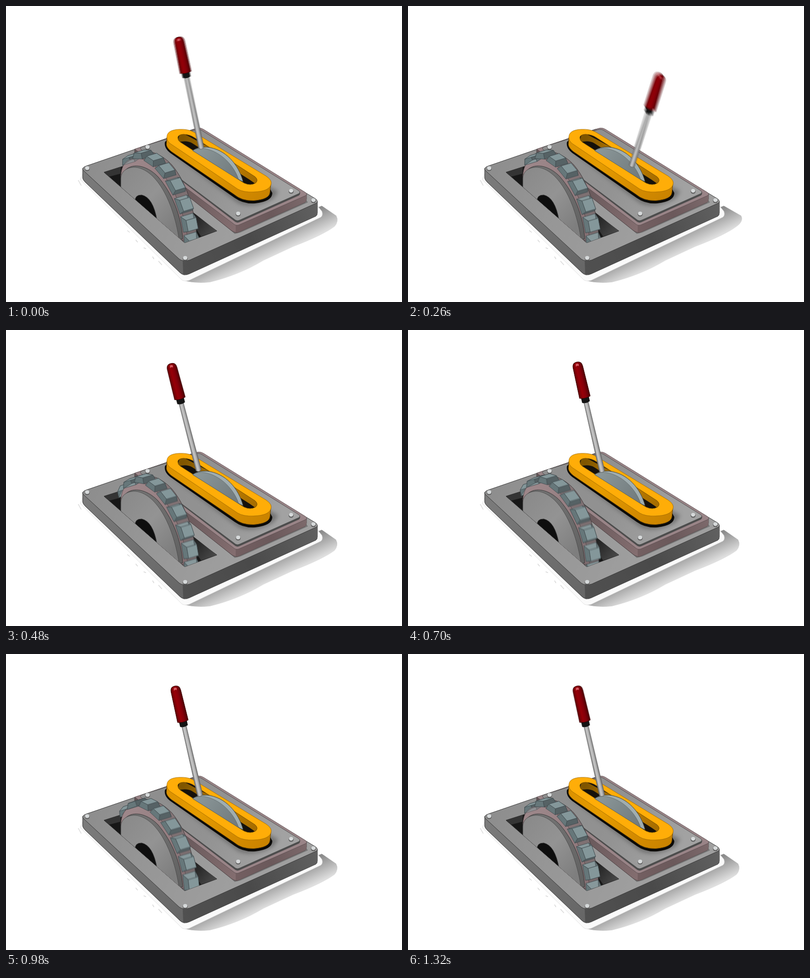
Animation of 800x600 px, one loop 1340 ms. Source, as an HTML page with a canvas:

```html
<!DOCTYPE html>
<html>
<head>
<meta charset="utf-8">
<title>Lever and gear</title>
<style>
html, body { margin: 0; width: 100%; height: 100%; overflow: hidden; background: #fff; }
canvas { display: block; }
</style>
</head>
<body>
<canvas id="stage" width="800" height="600"></canvas>
<script>
const LOOP = 1340, STEP = 20, SAMPLES = 5, SHUTTER = 9;
const ctx = document.getElementById('stage').getContext('2d');
const buffer = document.createElement('canvas');
buffer.width = 800;
buffer.height = 600;
const g = buffer.getContext('2d');

// keys: time, position of the handle tip
const LEVER = [[-20, 341], [0, 348], [60, 385], [120, 455], [200, 520], [260, 511], [380, 380],
  [460, 334], [480, 333], [540, 342], [600, 341], [1300, 341], [1320, 341], [1340, 348], [1400, 385]];
// keys: time, turn counted in teeth
const TURN = [[-100, 0], [0, 0], [260, 1.03], [480, 2.14], [700, 4.28], [860, 5.62],
  [1120, 7.46], [1320, 8], [1440, 8]];
// keys: tooth index, x, y along the rim
const RIM = [[-1, 234, 352], [0, 237, 322], [1, 251, 304], [2, 276, 295], [3, 301, 306], [4, 325, 328],
  [5, 347, 361], [6, 365, 402], [7, 376, 443], [8, 381, 484], [9, 381, 520]];

// smooth curve through the keys
function curve(keys, t) {
  let i = 0;
  while (i < keys.length - 2 && keys[i + 1][0] <= t) i++;
  const a = keys[i], b = keys[i + 1];
  const p = keys[Math.max(i - 1, 0)], n = keys[Math.min(i + 2, keys.length - 1)];
  const h = b[0] - a[0], s = (t - a[0]) / h, s2 = s * s, s3 = s2 * s;
  return a.slice(1).map((v, k) => {
    const w = b[k + 1];
    const m0 = (w - p[k + 1]) / (b[0] - p[0]), m1 = (n[k + 1] - v) / (n[0] - a[0]);
    return v + (w - v) * (3 * s2 - 2 * s3) + h * (m0 * (s3 - 2 * s2 + s) + m1 * (s3 - s2));
  });
}

function shape(d, fill, stroke, width = 1) {
  const path = new Path2D(d);
  if (fill) { g.fillStyle = fill; g.fill(path); }
  if (stroke) { g.strokeStyle = stroke; g.lineWidth = width; g.stroke(path); }
}

function fade(x0, y0, x1, y1, ...colors) {
  const f = g.createLinearGradient(x0, y0, x1, y1);
  colors.forEach((c, i) => f.addColorStop(i / (colors.length - 1), c));
  return f;
}

function quad(points, fill) {
  shape('M' + points.map(p => p.join(' ')).join('L') + 'Z', fill, '#414b4e', .8);
}

function screw(x, y) {
  shape(`M${x - 5} ${y + 1}a5 4.5 0 1 0 10 0a5 4.5 0 1 0 -10 0`, '#5c5c5c');
  shape(`M${x - 4.3} ${y - .4}a4.3 3.9 0 1 0 8.6 0a4.3 3.9 0 1 0 -8.6 0`, '#d6d9da');
}

function ground(pull) {
  const r = 670 + 6 * pull;
  shape(`M358 556Q380 563 412 560Q470 546 520 516L580 488Q640 465 664 447Q${r + 3} 436 ${r - 3} 425L638 405L600 420Z`,
    fade(490, 480, 519, 541, '#8c8c8c', '#b4b4b4', '#dedede', '#f1f1f1'));
  shape('M150 352L355 555Q360 559 370 556L636 428Q641 424 638 416L629 405L350 535L155 340Z', '#fafafa', '#dcdcdc', .8);
  shape('M146 353L152 364M245 455l5 4M262 474l4 5M278 490l5 2M296 508l3 5M308 517l7 8', null, '#dadada', 1.5);
}

function base() {
  shape('M155 329L155 349Q156 353 160 357L351 540Q359 548 370 543L626 426Q629 424 629 419L629 396L357 500Z',
    fade(155, 340, 357, 530, '#7b7b7b', '#676767'), '#303030');
  shape('M357 517Q364 518 371 515L629 398L629 419Q629 424 626 426L370 543Q364 546 358 545Z',
    fade(357, 530, 629, 410, '#505050', '#4a4a4a', '#606060'));
  shape('M155 329Q157 326 163 324L375 251Q385 247 395 251L624 390Q631 394 628 399L371 515Q358 519 350 513L158 335Q154 332 155 329Z',
    fade(160, 320, 480, 470, '#8d8d8d', '#979797', '#9f9f9f'), '#3a3a3a');
  shape('M345 355L462 462L474 459L610 398L604 390L463 442Z', '#777');
  shape('M198 337L245 322L426 456L361 480Z', '#171717', '#2b2b2b');
  shape('M360 404L426 456L394 467L370 430Z', fade(380, 430, 420, 460, '#222', '#484848'));
  shape('M198 337L232 326L231 340L208 346Z', '#343434');
}

function platform() {
  shape('M260 290L260 300L455 455Q464 462 471 458L604 398Q607 396 607 391L607 381L463 430Z',
    fade(340, 370, 464, 455, '#655658', '#846e70'), '#493e40');
  shape('M464 445L607 382L607 391Q607 396 604 398L471 458Q467 460 464 459Z',
    fade(464, 450, 607, 390, '#735f61', '#6b595b', '#7c696b'));
  shape('M260 290L378 251Q390 244 399 250L605 378Q609 381 606 384L470 444Q464 446 459 441Z',
    '#998487', '#594b4d', .8);
  shape('M272 291L461 436Q466 441 472 438L592 384Q595 381 594 377L460 425Z', '#4d4d4d');
  shape('M272 290Q270 287 276 285L380 252Q388 248 395 252L591 374Q595 377 592 380L472 434Q466 437 461 432Z',
    fade(290, 290, 540, 410, '#8e8e8e', '#929292', '#a2a2a2'), '#454545', .8);
  [[164, 329], [286, 286], [621, 394], [362, 511], [469, 421], [576, 375]].forEach(p => screw(...p));
}

function slot() {
  g.save();
  g.filter = 'blur(4px)';
  shape('M325 290L470 400Q500 412 540 390L550 376L520 360Z', '#5559');
  g.restore();
  shape('M321 276Q319 288 332 298L462 389Q480 402 504 400Q538 396 538 379L532 368L330 266Z', '#0b0a08');
  shape('M325 266L324 281Q325 288 334 295L461 382Q476 395 500 394.500Q531 392 533 379L535 361L500 350Z',
    fade(325, 280, 535, 380, '#dc9200', '#e59b00', '#d48b00', '#c98300'), '#6e4700');
  shape('M325 266Q325 251 350 250Q368 249 380 256L526 345Q539 354 535 363Q530 376 500 377Q480 378 468 371L332 279Q325 274 325 266Z',
    '#ffad08', '#9c6700', .8);
  const hole = 'M347 267Q347 261 358 260Q371 260 381 267L503 346Q511 353 504 359Q494 365 481 359L352 276Q347 272 347 267Z';
  g.save();
  g.clip(new Path2D(hole));
  shape(hole, '#15110b');
  shape('M352 255L520 345L512 366L492 352L376 278Q364 271 346 277Z', fade(360, 265, 505, 355, '#7f5500', '#c28000', '#a66d00'));
  g.restore();
  shape(hole, null, '#815500');
  shape('M377 293Q388 285 406 286C444 290 470 322 479 356L474 354Z', '#a0adaf', '#3d4648');
  shape('M377 293Q388 287 401 289C436 295 462 326 470 352Z', fade(385, 290, 470, 350, '#8b9799', '#70797b'), '#515b5d', .6);
}

function tooth(u) {
  const c = curve(RIM, u), p = curve(RIM, u - .27), q = curve(RIM, u + .27);
  const d = [(q[0] - p[0]) / 2, (q[1] - p[1]) / 2];
  const at = (across, along, depth) => [
    c[0] + 10 * across + d[0] * along + (296 - c[0]) * depth,
    c[1] - 3 * across + d[1] * along + (405 - c[1]) * depth];
  const corners = [[-1, -1], [1, -1], [1, 1], [-1, 1]];
  const top = corners.map(([x, y]) => at(x, y, 0));
  const foot = corners.map(([x, y]) => at(x * 1.25, y * 1.4, .1));
  ['#87989b', '#667477', '#566265', '#66777a'].forEach((color, i) => {
    const j = (i + 1) % 4;
    quad([top[i], top[j], foot[j], foot[i]], color);
  });
  quad(top, '#84979a');
}

function gear(turn) {
  const phase = turn - Math.floor(turn);
  const teeth = (from, to) => {
    for (let i = -1; i < 9; i++) {
      const u = i + phase;
      if (u >= from && u < to) tooth(u);
    }
  };
  g.save();
  g.clip(new Path2D('M190 200L198 337L361 480L426 456L470 200Z'));
  shape('M238 325C248 287 298 282 335 322C363 355 382 410 386 475L360 480L280 380Z',
    fade(250, 300, 380, 460, '#8c7b7d', '#766a6c'), '#3f3a3b');
  teeth(.1, 1);
  shape('M232 345C234 303 268 299 298 322C332 349 360 410 367 474L350 475L240 370Z',
    fade(240, 320, 365, 465, '#9d878a', '#947d80', '#846f72'), '#594b4d');
  teeth(1, 8.4);
  shape('M234 350C236 320 275 313 307 346C336 380 354 425 357 472L340 475Z',
    fade(260, 325, 355, 460, '#747474', '#626262'), '#383838');
  shape('M232 370L232 350C232 335 245 326 262 327C300 331 337 388 350 475Z',
    fade(235, 340, 345, 440, '#8a8a8a', '#939393', '#7e7e7e'), '#464646', .8);
  shape('M261 396Q260 383 274 383Q297 388 305 434Z', '#0e0e0e', '#333');
  g.restore();
}

function lever(x) {
  const y = 59 + .00445 * (x - 377.7) ** 2;
  const bx = 392 + (x - 341) * .353, by = 286 + (bx - 392) * .633;
  const length = Math.hypot(bx - x, by - y);
  g.save();
  g.translate(x, y);
  g.rotate(Math.atan2(by - y, bx - x) - Math.PI / 2);
  shape(`M-4.500 82L-5.500 ${length}Q0 ${length + 5} 5.500 ${length}L4.500 82Z`,
    fade(-5, 0, 5, 0, '#777', '#c9c9c9', '#b3b3b3', '#707070'), '#5a5a5a', .7);
  shape('M-8 72L-8 83Q0 87 8 83L8 72Z', '#141414');
  shape('M-10 11Q-10 0 0 0Q10 0 10 11L11 73Q0 77 -11 73Z',
    fade(-10, 0, 10, 0, '#690006', '#980008', '#84000a', '#520005'), '#380003');
  shape('M-3 4Q0 2 3 5L2 9Q-1 6 -4 9Z', '#d65b62');
  g.restore();
}

function scene(t) {
  const [x] = curve(LEVER, t), [turn] = curve(TURN, t);
  g.fillStyle = '#fff';
  g.fillRect(0, 0, 800, 600);
  ground((x - 341) / 170);
  base();
  platform();
  slot();
  gear(turn);
  lever(x);
}

function frame(now) {
  const t = Math.floor(now % LOOP / STEP) * STEP;
  // average a few moments for motion blur
  for (let k = 0; k < SAMPLES; k++) {
    scene(t + (k / (SAMPLES - 1) - .5) * SHUTTER);
    ctx.globalAlpha = 1 / (k + 1);
    ctx.drawImage(buffer, 0, 0);
  }
  requestAnimationFrame(frame);
}

frame(0);
</script>
</body>
</html>
```
